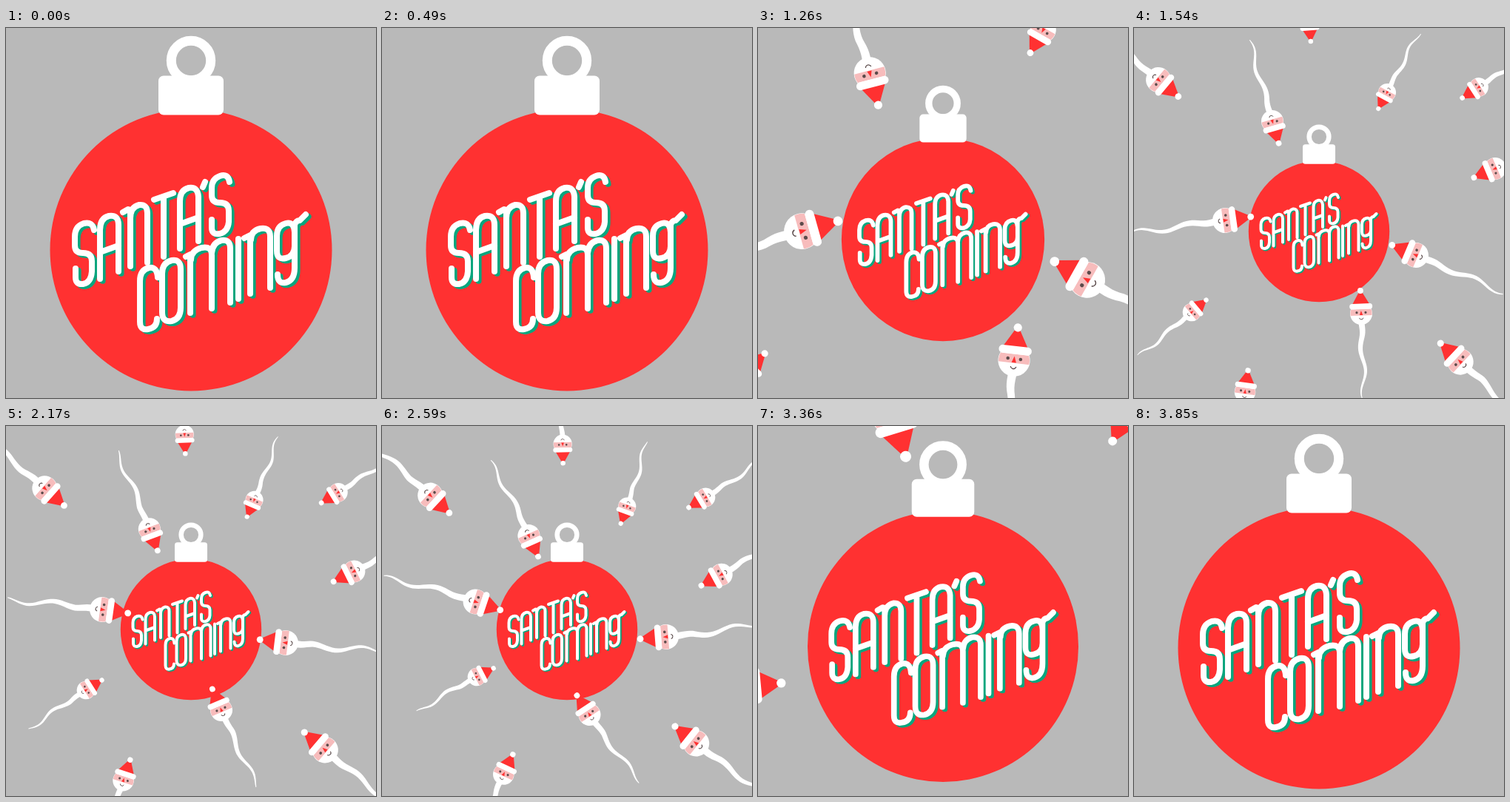
These frames come from a looping animation (500 by 500 pixels, 3.92 s). An HTML page with a canvas:

```html
<!DOCTYPE html>
<html lang="en">
<head>
<meta charset="utf-8">
<title>Santa's coming</title>
<style>
  html, body { margin: 0; width: 100%; height: 100%; overflow: hidden; background: #b9b9b9; }
  canvas { display: block; width: 500px; height: 500px; }
</style>
</head>
<body>
<canvas id="stage" width="500" height="500"></canvas>
<script>
const ctx = document.getElementById('stage').getContext('2d');
const LOOP = 3920, STEP = 70, TAU = Math.PI * 2;
const GREY = '#b9b9b9', RED = '#ff3131', GREEN = '#09a67e', PINK = '#f7bcbc', DARK = '#5b4b4b', WHITE = '#fff';

// One stroke path per letter, in the close-up view.
const letters = [
  'M119 273Q117 261 105 264Q93 268 93 282V294Q93 304 104 304Q116 304 116 315V329Q115 344 104 346Q94 347 94 337V325',
  'M127 339V273Q127 257 139 254Q152 252 152 266V329M127 303L152 294',
  'M158 249L165 245Q168 245 168 251V322M168 257Q168 242 180 239Q191 238 191 250V317',
  'M200 232L226 223M213 229V309',
  'M235 298V234Q235 219 247 216Q259 214 260 228V288M235 265L260 256',
  'M269 208L266 215',
  'M302 208Q300 196 289 200Q278 204 278 216V226Q278 236 289 236Q301 236 301 247V262Q300 275 289 278Q278 280 278 270V259',
  'M205 337Q204 322 193 324Q181 327 181 342V397Q181 409 192 407Q204 405 204 393',
  'M211 332Q211 317 224 314Q236 312 236 326V378Q236 393 224 396Q211 398 211 384Z',
  'M243 309L249 306V385M250 313Q250 301 264 297Q278 294 278 307V379M278 304Q279 290 291 287Q303 285 303 298V371',
  'M314 285V366',
  'M322 284L330 280V359M331 286Q331 274 344 271Q357 269 357 282V351',
  'M390 276Q389 261 378 264Q366 267 366 281V301Q366 314 378 311Q390 308 390 295V266Q392 260 397 260L405 252M390 295V324Q390 341 378 344Q367 346 367 333'
].map(d => new Path2D(d));

// Each pose is [face x, face y, turn in degrees] in the wide view.
const EDGES = [1540, 3010], EDGES_AND_MIDDLE = [1540, 2170, 3010];
const santas = [
  { size: 1,    poses: [[187, 126, 164], [203, 157, 153]] },
  { size: 1.13, poses: [[123, 260, 82], [130, 248, 98], [123, 227, 119]] },
  { size: 1.13, poses: [[381, 307, -67], [378, 293, -83], [390, 277, -106]] },
  { size: 1,    poses: [[307, 386, -2], [291, 384, -23], [270, 396, -44]] },
  { size: .82,  poses: [[78, 384, 50], [148, 321, 68]] },
  { size: 1.13, poses: [[33, 70, 130], [78, 103, 134]] },
  { size: .84,  poses: [[237, -8, 176], [247, 37, 180]] },
  { size: .8,   poses: [[342, 87, 208], [327, 117, 197]] },
  { size: .86,  poses: [[466, 80, 237], [426, 103, 240]] },
  { size: 1,    poses: [[488, 190, 247], [447, 205, 239]] },
  { size: 1.18, poses: [[441, 451, -47], [418, 420, -53]] },
  { size: .95,  poses: [[150, 492, 8], [170, 462, 32]] }
];

function ease(x) {
  const p = Math.min(1, Math.max(0, x));
  return (1 - Math.cos(Math.PI * p)) / 2;
}

function closeness(t) {
  return 1 - ease((t - 980) / 520) + ease((t - 2930) / 525);
}

function poseAt(poses, t) {
  const times = poses.length === 3 ? EDGES_AND_MIDDLE : EDGES;
  const i = poses.length === 3 && t > times[1] ? 1 : 0;
  const p = (t - times[i]) / (times[i + 1] - times[i]);
  return poses[i].map((v, k) => v + (poses[i + 1][k] - v) * p);
}

function disc(x, y, r, color) {
  ctx.fillStyle = color;
  ctx.beginPath();
  ctx.arc(x, y, r, 0, TAU);
  ctx.fill();
}

function box(x, y, w, h, r, color) {
  ctx.fillStyle = color;
  ctx.beginPath();
  ctx.roundRect(x, y, w, h, r);
  ctx.fill();
}

function polygon(points, color) {
  ctx.fillStyle = color;
  ctx.beginPath();
  points.forEach(p => ctx.lineTo(...p));
  ctx.fill();
}

function drawBall() {
  disc(250, 300, 190.5, RED);
  ctx.strokeStyle = WHITE;
  ctx.lineWidth = 13;
  ctx.beginPath();
  ctx.arc(250, 44, 26.7, 0, TAU);
  ctx.stroke();
  box(206, 64.5, 88, 53, 7, WHITE);
}

function drawLettering() {
  ctx.lineCap = ctx.lineJoin = 'round';
  ctx.lineWidth = 8;
  for (const [color, dx, dy] of [[GREEN, 3.6, 2.8], [WHITE, 0, 0]]) {
    ctx.save();
    ctx.translate(dx, dy);
    ctx.strokeStyle = color;
    letters.forEach(letter => ctx.stroke(letter));
    ctx.restore();
  }
}

function drawTail(phase, bend) {
  const left = [], right = [];
  for (let i = 0; i <= 30; i++) {
    const s = i / 30;
    const wave = (2 + 2 * s) * Math.sin(s * 10.7 - phase) * Math.min(1, s * 5);
    const x = wave + bend * s * s;
    const half = 3.6 * (1 - s) ** .8 + .5;
    const y = 12 + 102 * s;
    left.push([x - half, y]);
    right.unshift([x + half, y]);
  }
  polygon([...left, ...right], WHITE);
}

function drawHead() {
  disc(0, 0, 15, WHITE);
  ctx.save();
  ctx.beginPath();
  ctx.arc(0, 0, 14.6, 0, TAU);
  ctx.clip();
  ctx.fillStyle = PINK;
  ctx.fillRect(-15, -6, 30, 8.5);
  ctx.restore();

  disc(-6, -1.5, 1.6, DARK);
  disc(6, -1.5, 1.6, DARK);
  polygon([[0, -4], [2.2, 2], [-2.2, 2]], RED);
  ctx.strokeStyle = DARK;
  ctx.lineWidth = .9;
  ctx.beginPath();
  ctx.arc(0, 5.2, 2.7, .2, Math.PI - .2);
  ctx.stroke();

  polygon([[-12.5, -11], [-2.2, -29], [2.2, -29], [12.5, -11]], RED);
  box(-15.5, -13.5, 31, 7.5, 3.7, WHITE);
  disc(0, -31, 3.9, WHITE);
}

function drawSanta({ size, poses }, index, t, push) {
  const [x, y, degrees] = poseAt(poses, t);
  const outward = 1 + push / Math.hypot(x - 250, y - 250);
  ctx.save();
  ctx.translate((x - 250) * outward, (y - 250) * outward);
  ctx.rotate(degrees * Math.PI / 180);
  ctx.scale(size, size);
  drawTail(t / 500 * TAU + 4.1 + index * .2, 12 * (t - 1540) / 1470);
  drawHead();
  ctx.restore();
}

// While the view is close, the crowd is spread outwards and swirls clockwise.
function drawCrowd(t, near) {
  const spread = near ** 4;
  const swirl = .3 * spread * Math.sign(t - LOOP / 2);
  ctx.translate(250, 250);
  ctx.rotate(swirl);
  santas.forEach((santa, i) => drawSanta(santa, i, t, 65 * spread));
}

function zoomed(scale, draw) {
  ctx.save();
  ctx.translate(250, 250);
  ctx.scale(scale, scale);
  ctx.translate(-250, -250);
  draw();
  ctx.restore();
}

function render(t) {
  const near = closeness(t);
  const scale = .5 + .5 * near;
  ctx.fillStyle = GREY;
  ctx.fillRect(0, 0, 500, 500);
  zoomed(scale, () => {
    drawBall();
    drawLettering();
  });
  if (near < .999) zoomed(scale * 2, () => drawCrowd(t, near));
}

const start = performance.now();
function tick() {
  const t = (performance.now() - start) % LOOP;
  render(Math.floor(t / STEP) * STEP);
  requestAnimationFrame(tick);
}
tick();
</script>
</body>
</html>
```
